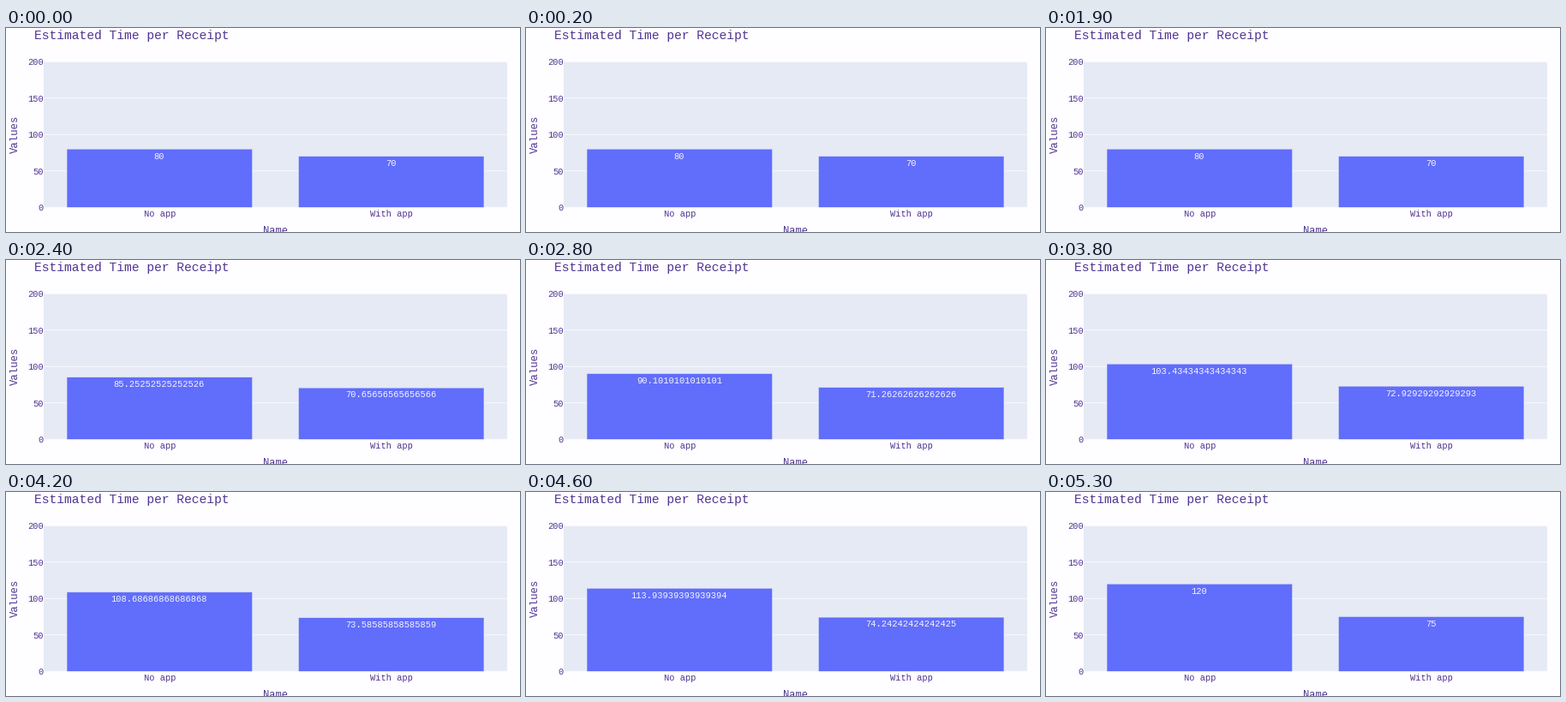
Write a matplotlib script that moves like this. It is 600 px wide and 238 px high and loops after 7900 ms.

```python
import math

import matplotlib.pyplot as plt
import numpy as np
from matplotlib.animation import FuncAnimation
from matplotlib.patches import Rectangle

W, H, DPI = 600, 238, 100
FRAMES, INTERVAL = 79, 100

PAPER, PLOT, BAR, INK = "#fefdff", "#e5eaf5", "#616dfb", "#503592"
LEFT, RIGHT, TOP, BASE = 44, 585, 39.3, 209.2
UNIT = (BASE - TOP) / 200
SLOT = (RIGHT - LEFT) / 2
BAR_W = 0.8 * SLOT

# Both bars run through the same number of evenly spaced steps.
STEPS = 100
NAMES = ["No app", "With app"]
SERIES = [np.linspace(80, 120, STEPS), np.linspace(70, 75, STEPS)]

fig = plt.figure(figsize=(W / DPI, H / DPI), dpi=DPI, facecolor=PAPER)
ax = fig.add_axes([0, 0, 1, 1])
ax.set_xlim(0, W)
ax.set_ylim(H, 0)
ax.axis("off")


def px(size):
    """Convert pixels to points."""
    return size * 72 / DPI


def label(x, y, text, size=10.4, color=INK, ha="center", **kw):
    kw.setdefault("va", "baseline")
    return ax.text(x, y, text, fontsize=px(size), color=color, ha=ha,
                   family="Liberation Mono", **kw)


def y_of(value):
    return BASE - value * UNIT


def step_at(frame):
    step = math.floor(13.05 + 3.23 * (frame - 24))
    return min(max(step, 0), STEPS - 1)


def number(value):
    value = float(value)
    return str(int(value)) if value.is_integer() else repr(value)


ax.add_patch(Rectangle((LEFT, TOP), RIGHT - LEFT, BASE - TOP,
                       facecolor=PLOT, linewidth=0, snap=False, zorder=0))
for tick in range(0, 201, 50):
    y = y_of(tick)
    ax.plot([LEFT, RIGHT], [y, y], color="white", alpha=0.85,
            linewidth=px(0.87), solid_capstyle="butt", snap=False, zorder=1)
    label(43.7, y + 3.8, str(tick), ha="right")

label(33, 13, "Estimated Time per Receipt", 14.65, ha="left")
label((LEFT + RIGHT) / 2, 240.5, "Name", 12.15)
label(16.5, 123.6, "Values", 12.3, rotation=90, ha="right", va="center")

bars, values = [], []
for i, name in enumerate(NAMES):
    center = LEFT + SLOT * (i + 0.5)
    bar = Rectangle((center - BAR_W / 2, BASE), BAR_W, 0, facecolor=BAR,
                    edgecolor=PLOT, linewidth=px(0.43), snap=False, zorder=2)
    bars.append(ax.add_patch(bar))
    values.append(label(center - 0.3, BASE, "", color="#f4f5ff"))
    label(center + 0.3, 220.5, name)


def update(frame):
    step = step_at(frame)
    for bar, text, series in zip(bars, values, SERIES):
        top = y_of(series[step])
        bar.set_y(top)
        bar.set_height(BASE - top)
        text.set_y(top + 11.3)
        text.set_text(number(series[step]))
    return bars + values


anim = FuncAnimation(fig, update, frames=FRAMES, interval=INTERVAL,
                     repeat=True, repeat_delay=0)
plt.show()
```
